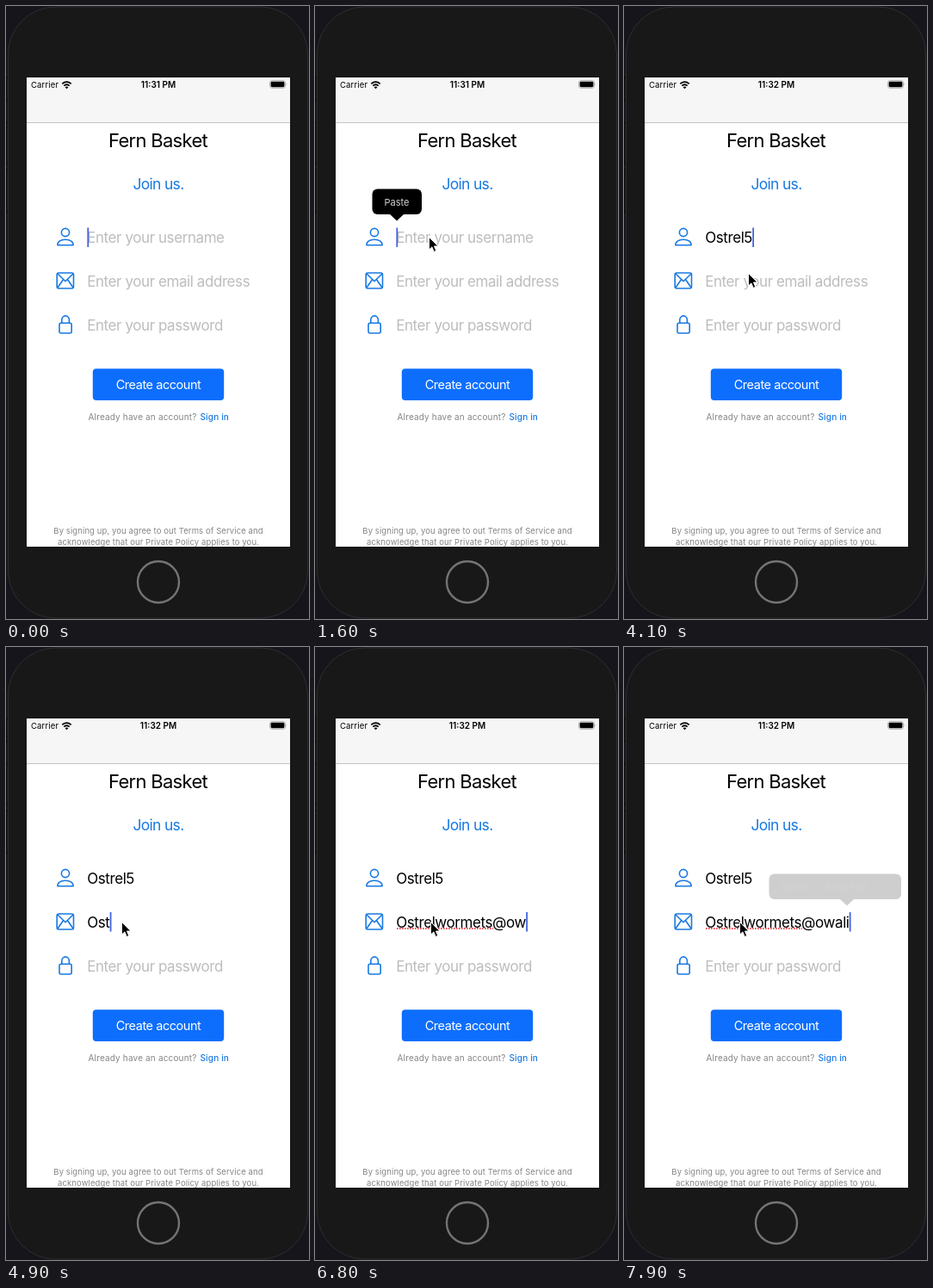
An HTML page that plays this animation: 352x712 px, repeating every 8000 ms.

```html
<!DOCTYPE html>
<html lang="en">
<head>
<meta charset="utf-8">
<title>Sign-up form</title>
<style>
  html, body { margin: 0; width: 100%; height: 100%; overflow: hidden; background: #15151b; }
  svg { display: block; width: 352px; height: 712px; }
  text { font-family: Inter, Roboto, sans-serif; }
  .mid { text-anchor: middle; }
  .field { font-size: 17px; letter-spacing: -.42px; }
  .hint { fill: #bdbdbd; }
  .icon { fill: none; stroke: #1879e2; stroke-width: 1.6; stroke-linejoin: round; stroke-linecap: round; }
  .small { font-size: 10px; letter-spacing: .16px; }
  .legal { font-size: 9.5px; letter-spacing: .1px; fill: #858585; }
</style>
</head>
<body>
<svg viewBox="0 0 352 712">
  <!-- phone -->
  <rect width="352" height="712" fill="#15151b"/>
  <path d="M0 83h4v27H0zM0 135h4v48H0zM0 190h4v49H0z" fill="#181818" stroke="#050505"/>
  <rect x="2.5" y="1" width="348" height="710" rx="55" fill="#181818" stroke="#2e2e31"/>
  <circle cx="177" cy="669" r="24" fill="#181818" stroke="#747474" stroke-width="2.4"/>
  <rect x="24" y="83" width="306" height="545" fill="#fff"/>
  <rect x="24" y="83" width="306" height="52" fill="#f6f6f6"/>
  <rect x="24" y="135" width="306" height="1" fill="#c4c4c4"/>

  <!-- status bar -->
  <text x="29" y="95" font-size="9.5" letter-spacing=".15">Carrier</text>
  <g fill="none" stroke="#000" stroke-width="1.7">
    <path d="M65.3 90.3q5.2-4.5 10.4 0M67.3 92.6q3.2-2.7 6.4 0"/>
    <path d="M70.5 96.2l-2-2q2-1.5 4 0z" fill="#000" stroke="none"/>
  </g>
  <text id="clock" class="mid" x="177" y="95" font-size="10" font-weight="600"></text>
  <rect x="306.5" y="86.7" width="18" height="8.6" rx="2.4" fill="none" stroke="#a0a0a0" stroke-width=".8"/>
  <rect x="307.6" y="87.8" width="15.8" height="6.4" rx="1.4"/>
  <path d="M325.6 89.5q1.4 1.5 0 3z" fill="#a0a0a0"/>

  <!-- form -->
  <text class="mid" x="176.5" y="164" font-size="22" letter-spacing="-.7">Fern Basket</text>
  <text class="mid" x="177" y="212.5" font-size="17.5" letter-spacing="-.7" fill="#1879e2">Join us.</text>
  <g class="icon">
    <circle cx="69" cy="263" r="4.6"/>
    <path d="M60 277.8c-.6-3.8 3.3-6.6 9-6.6s9.6 2.8 9 6.6z"/>
    <rect x="59.2" y="310" width="19.3" height="18" rx="2"/>
    <path d="M60 311l9 8.8 9-8.8M60 327l6.3-9M78 327l-6.3-9"/>
    <rect x="62" y="368.3" width="14.2" height="11.7" rx="2"/>
    <path d="M64.8 368v-3.5a4.3 4.6 0 0 1 8.6 0v3.5"/>
  </g>
  <text id="user" class="field" x="94.2" y="275"></text>
  <text id="mail" class="field" x="94.2" y="326"></text>
  <text class="field hint" x="94.2" y="376.5">Enter your password</text>
  <line id="squiggle" x1="95" x2="207" y1="327" y2="327" stroke="#e8202a" stroke-width="1.6" stroke-dasharray="1.7 1.3"/>
  <rect id="caret" width="1.8" height="22.5" fill="#4263df"/>
  <rect x="100.8" y="421.3" width="152.4" height="36.7" rx="4" fill="#0d6efd"/>
  <text class="mid" x="177" y="445" font-size="14.5" letter-spacing="-.45" fill="#fff">Create account</text>
  <text class="small" x="95.5" y="481" fill="#858585">Already have an account?</text>
  <text class="small" x="225.5" y="481" fill="#1879e2" font-weight="500">Sign in</text>
  <text class="legal mid" x="177" y="612.5">By signing up, you agree to out Terms of Service and</text>
  <text class="legal mid" x="177" y="625.5">acknowledge that our Private Policy applies to you.</text>

  <!-- edit menus -->
  <g id="pasteMenu">
    <rect x="66.5" y="212.5" width="57.5" height="29.5" rx="6"/>
    <path d="M86.5 241.5h17l-8.5 8z"/>
    <text class="mid" x="95" y="231.5" font-size="11" fill="#d2d2d2">Paste</text>
  </g>
  <g id="selectMenu">
    <rect x="168.5" y="263.5" width="153.5" height="29.5" rx="6"/>
    <path d="M250.5 292.5h17l-8.5 8z"/>
    <text x="183" y="282.5" font-size="11" fill="#1c1c1c">Select</text>
    <text x="234" y="282.5" font-size="11" fill="#1c1c1c">Select All</text>
  </g>
  <path id="pointer" d="M0 0V14.5L3.4 11.4 5.7 17 8.3 15.9 6 10.5H10.6Z" stroke="#fff" stroke-width="1"/>
</svg>
<script>
const LOOP = 8000, STEP = 100;
const $ = id => document.getElementById(id);
const userField = {
  node: $('user'), value: 'Ostrel5', hint: 'Enter your username', top: 257.5,
  keys: [2400, 2500, 2600, 2700, 2800, 2900, 3200]
};
const mailField = {
  node: $('mail'), value: 'Ostrelwormets@owali', hint: 'Enter your email address', top: 308,
  keys: [4700, 4800, 4900, 5100, 5300, 5500, 5700, 5800, 5800, 5900, 5900, 6000, 6000,
         6300, 6500, 6700, 6900, 7000, 7000]
};
const pointerPath = [
  [100, 264, 604], [1000, 195, 428], [1200, 178, 426], [1400, 132.5, 268.5],
  [3700, 132.5, 268.5], [4000, 144.5, 310.5], [4400, 144.5, 310.5], [4700, 134.5, 319.5]
];
const caretBlinks = [[400, 800], [1850, 2150], [7350, 7850]];

const clamp = v => Math.max(0, Math.min(1, v));
const pulse = (t, from, to, fade) => clamp(Math.min(t - from, to - t) / fade);
const show = (id, opacity) => $(id).setAttribute('opacity', opacity);

function pointerAt(t) {
  const next = pointerPath.findIndex(p => p[0] > t);
  if (next < 0) return pointerPath.at(-1).slice(1);
  if (next === 0) return pointerPath[0].slice(1);
  const [a, b] = [pointerPath[next - 1], pointerPath[next]];
  const u = (t - a[0]) / (b[0] - a[0]), k = u * u * (3 - 2 * u);
  return [1, 2].map(i => a[i] + (b[i] - a[i]) * k);
}

// Returns the width of the typed text, 0 while the hint shows.
function typeInto(field, t) {
  const count = field.keys.filter(k => k <= t).length;
  field.node.textContent = count ? field.value.slice(0, count) : field.hint;
  field.node.classList.toggle('hint', !count);
  return count ? field.node.getComputedTextLength() : 0;
}

function draw(t) {
  $('clock').textContent = t < 2300 ? '11:31 PM' : '11:32 PM';
  const userWidth = typeInto(userField, t), mailWidth = typeInto(mailField, t);
  const inMail = t >= 4400;
  $('caret').setAttribute('x', 94.4 + (inMail ? mailWidth : userWidth));
  $('caret').setAttribute('y', (inMail ? mailField : userField).top);
  show('caret', 1 - Math.max(...caretBlinks.map(([a, b]) => pulse(t, a, b, 150))));
  show('squiggle', t >= 6300 ? 1 : 0);
  show('pasteMenu', pulse(t, 1400, 2400, 200));
  show('selectMenu', t >= 7900 ? .19 : 0);
  show('pointer', t >= 100 ? 1 : 0);
  $('pointer').setAttribute('transform', `translate(${pointerAt(t)})`);
}

const start = performance.now();
function tick() {
  const t = (performance.now() - start) % LOOP;
  draw(Math.floor(t / STEP) * STEP);
  requestAnimationFrame(tick);
}
tick();
</script>
</body>
</html>
```
